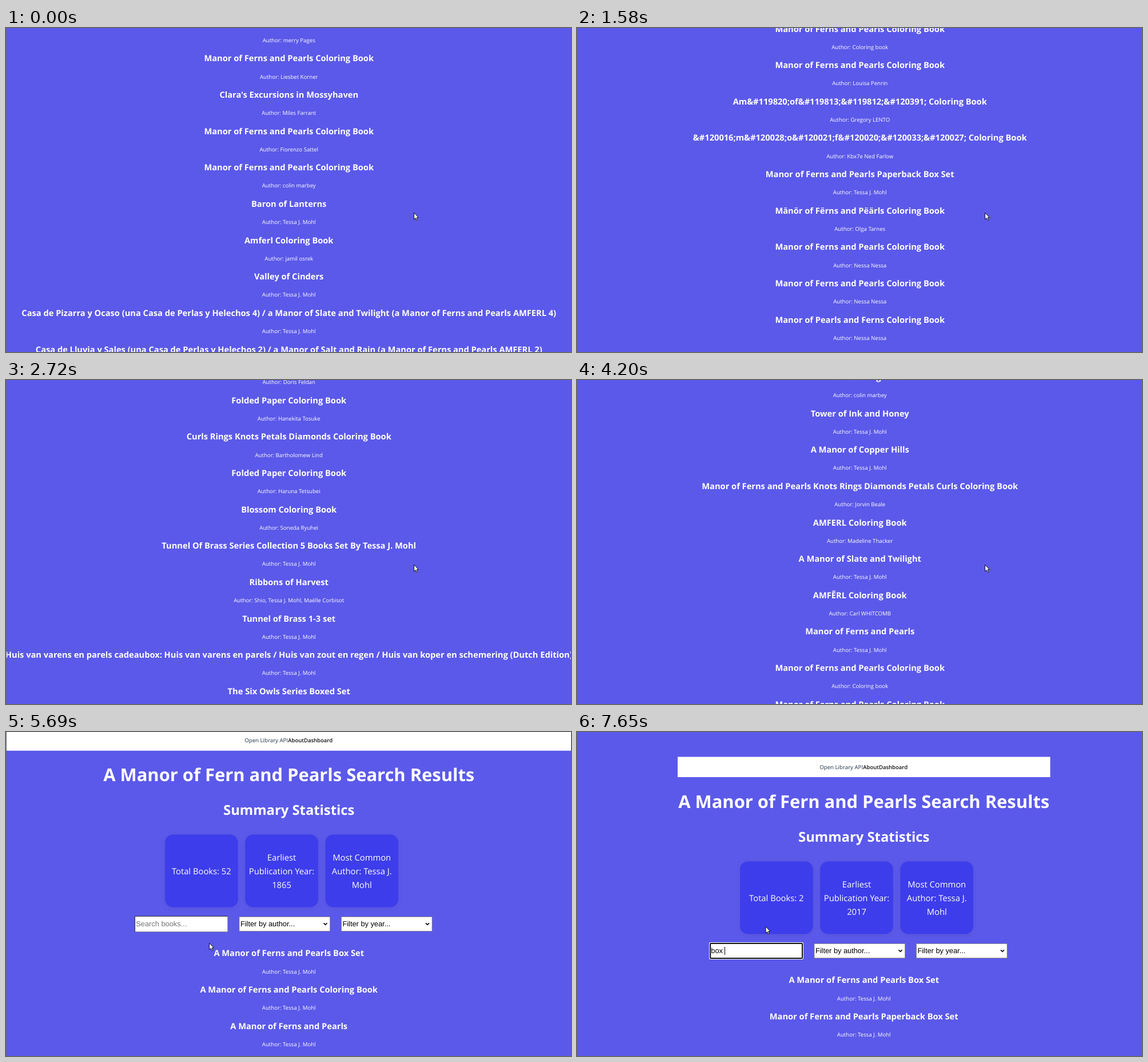
An HTML page with a canvas for the animation above (8000 ms loop, 988 by 567 pixels).

```html
<!DOCTYPE html>
<html lang="en">
<head>
<meta charset="utf-8">
<title>Book search dashboard</title>
<style>
html, body { margin: 0; width: 100%; height: 100%; overflow: hidden; background: #5b59e9; }
canvas { display: block; }
</style>
</head>
<body>
<canvas id="stage" width="988" height="567"></canvas>
<script>
const ctx = document.getElementById('stage').getContext('2d');
const LOOP = 8000;
const SANS = '"Open Sans", "Noto Sans", sans-serif';
const FORM = '"Liberation Sans", Arial, sans-serif';
const BG = '#5b59e9', CARD = '#3d3deb';
const CX = 494.7, PITCH = 63.65;

const LEAD = 'Tessa J. Mohl';
const SERIES = 'Manor of Ferns and Pearls';
const CB = 'Coloring Book';
const SCB = `${SERIES} ${CB}`;

// [title, author]; the lead author is the default
const books = [
  [`A ${SERIES} Box Set`],
  [`A ${SERIES} ${CB}`],
  [`A ${SERIES}`],
  ['Lantern of Glaciers'],
  ['The Copper Heiress'],
  ['A Manor of Hail and Amber'],
  ['Daughter of Willows'],
  [SCB, 'merry Pages'],
  [SCB, 'Liesbet Korner'],
  ["Clara's Excursions in Mossyhaven", 'Miles Farrant'],
  [SCB, 'Fiorenzo Sattel'],
  [SCB, 'colin marbey'],
  ['Baron of Lanterns'],
  [`Amferl ${CB}`, 'jamil osrek'],
  ['Valley of Cinders'],
  [`Casa de Pizarra y Ocaso (una Casa de Perlas y Helechos 4) / a Manor of Slate and Twilight (a ${SERIES} AMFERL 4)`],
  [`Casa de Lluvia y Sales (una Casa de Perlas y Helechos 2) / a Manor of Salt and Rain (a ${SERIES} AMFERL 2)`],
  ['A Manor of Salt and Rain'],
  [`Amferl ${CB}`, 'colin marbey'],
  ['Tower of Ink and Honey'],
  ['A Manor of Copper Hills'],
  [`${SERIES} Knots Rings Diamonds Petals Curls ${CB}`, 'Jorvin Beale'],
  [`AMFERL ${CB}`, 'Madeline Thacker'],
  ['A Manor of Slate and Twilight'],
  [`AMF\u1EBCRL ${CB}`, 'Carl WHITCOMB'],
  [SERIES],
  [SCB, 'Coloring book'],
  [SCB, 'Louisa Penrin'],
  [`Am&#119820;of&#119813;&#119812;&#120391; ${CB}`, 'Gregory LENTO'],
  [`&#120016;m&#120028;o&#120021;f&#120020;&#120033;&#120027; ${CB}`, 'Kbx7e Ned Farlow'],
  [`${SERIES} Paperback Box Set`],
  [`Mänör of Fërns and Pëärls ${CB}`, 'Olga Tarnes'],
  [SCB, 'Nessa Nessa'],
  [SCB, 'Nessa Nessa'],
  [`Manor of Pearls and Ferns ${CB}`, 'Nessa Nessa'],
  [`${SCB} for Kids and Adults`, 'Nessa Nessa'],
  [SCB, 'Doris Feldan'],
  [`Folded Paper ${CB}`, 'Hanekita Tosuke'],
  [`Curls Rings Knots Petals Diamonds ${CB}`, 'Bartholomew Lind'],
  [`Folded Paper ${CB}`, 'Haruna Tetsubei'],
  [`Blossom ${CB}`, 'Soneda Ryuhei'],
  [`Tunnel Of Brass Series Collection 5 Books Set By ${LEAD}`],
  ['Ribbons of Harvest', `Shio, ${LEAD}, Maëlle Corbisot`],
  ['Tunnel of Brass 1-3 set'],
  ['Huis van varens en parels cadeaubox: Huis van varens en parels / Huis van zout en regen / Huis van koper en schemering (Dutch Edition)'],
  ['The Six Owls Series Boxed Set'],
  ['Tunnel of Brass'],
  ['Heir of Lanterns'],
  ['The Brass Compass'],
  [`Blossom ${CB}`, 'Soneda Ryuhei'],
  ['Tower of Moss and Iron'],
  ['Meadow of Quiet Bells']
];

// [start ms, value...]
const scrollSteps = [
  [0, 843.3], [150, 960], [400, 1070], [520, 1290], [640, 1424.3],
  [1040, 1500], [1190, 1610], [1310, 1740], [1430, 1880], [1580, 2040.8],
  [1730, 2140], [1880, 2252], [2030, 2330], [2180, 2410], [2330, 2505],
  [2480, 2590], [2600, 2660], [2720, 2706.8], [3810, 2480], [3960, 2170],
  [4080, 1850], [4200, 1538.2], [4320, 1290], [4450, 1030], [4570, 790],
  [4720, 590], [4840, 365], [4990, 0]
];
const cursorSteps = [
  [0, 713, 323], [5420, 678, 325], [5570, 520, 350],
  [5690, 355, 369], [5840, 328, 335], [5960, 329.5, 340]
];
const querySteps = [
  [0, '', 1865], [7070, 'bo', 2014], [7500, 'box', 2017], [7650, 'box ', 2017]
];
const FOCUS = 6110, BLINK = 6640, TYPING = 7070, COMPACT = 7650;

const at = (steps, t) => steps.filter(s => s[0] <= t).pop();

function text(str, x, y, font, color = '#fff', align = 'center') {
  ctx.font = font;
  ctx.fillStyle = color;
  ctx.textAlign = align;
  ctx.fillText(str, x, y);
}

function rect(x, y, w, h, color) {
  ctx.fillStyle = color;
  ctx.fillRect(x, y, w, h);
}

function drawNav(compact) {
  if (compact) rect(169, -3.5, 651.5, 35.5, '#fff');
  else rect(1, -4, 987, 36.7, '#fff');
  text('Open Library API', 417.2, 18.4, `400 9.7px ${SANS}`, '#213547', 'left');
  text('AboutDashboard', 493.2, 18.4, `600 9.5px ${SANS}`, '#111', 'left');
}

function drawCard(x, lines) {
  ctx.save();
  ctx.shadowColor = 'rgba(0,0,0,0.06)';
  ctx.shadowBlur = 10;
  ctx.shadowOffsetY = 2;
  ctx.fillStyle = CARD;
  ctx.beginPath();
  ctx.roundRect(x, 179.5, 127.6, 127, 14);
  ctx.fill();
  ctx.restore();
  lines.forEach((line, i) => {
    const y = 249.2 + (i - (lines.length - 1) / 2) * 24;
    text(line, x + 63.8, y, `400 14.75px ${SANS}`);
  });
}

function drawSelect(x, label) {
  rect(x, 323, 159.5, 26, '#767676');
  rect(x + 0.8, 323.8, 157.9, 24.4, '#fff');
  text(label, x + 2.4, 340.3, `12.8px ${FORM}`, '#000', 'left');
  ctx.strokeStyle = '#000';
  ctx.lineWidth = 1.5;
  ctx.beginPath();
  ctx.moveTo(x + 148, 334.4);
  ctx.lineTo(x + 151, 337.4);
  ctx.lineTo(x + 154, 334.4);
  ctx.stroke();
}

function drawSearch(t, query) {
  if (t >= FOCUS) {
    ctx.fillStyle = '#fff';
    ctx.beginPath();
    ctx.roundRect(224, 321, 165, 30, 2.5);
    ctx.fill();
    ctx.fillStyle = '#101010';
    ctx.beginPath();
    ctx.roundRect(225, 322, 163, 28, 2);
    ctx.fill();
    rect(227, 324, 159, 24, '#fff');
  } else {
    rect(225, 322, 163, 28, '#9a9a9a');
    rect(225, 322, 163, 1, '#333');
    rect(225, 322, 1, 28, '#333');
    rect(226, 323, 161, 26, '#fff');
  }
  const font = `12.8px ${FORM}`;
  if (query) text(query, 227.3, 340.3, font, '#000', 'left');
  else text('Search books...', 227.3, 340.3, font, '#757575', 'left');
  if (t >= FOCUS && (t < BLINK || t >= TYPING)) {
    ctx.font = font;
    rect(227 + Math.round(ctx.measureText(query).width), 329, 1, 14, '#000');
  }
}

function drawBook([title, author = LEAD], i, scroll) {
  const y = 392.4 + i * PITCH;
  if (y - scroll < -50 || y - scroll > 600) return;
  text(title, CX, y, `700 14.65px ${SANS}`);
  text(`Author: ${author}`, CX, y + 30.2, `500 9.65px ${SANS}`);
}

function drawPointer(x, y) {
  const pts = [[0, 0], [0, 11.4], [2.6, 9], [4.4, 13.1], [6.2, 12.3], [4.5, 8.4], [7.8, 8.2]];
  ctx.beginPath();
  pts.forEach(([px, py]) => ctx.lineTo(x + 0.5 + px, y + 0.5 + py));
  ctx.closePath();
  ctx.fillStyle = '#fff';
  ctx.fill();
  ctx.strokeStyle = '#000';
  ctx.lineWidth = 0.9;
  ctx.stroke();
}

function draw(t) {
  const scroll = at(scrollSteps, t)[1];
  const [, query, year] = at(querySteps, t);
  const [, px, py] = at(cursorSteps, t);
  const compact = t >= COMPACT;
  const found = books.filter(b => b[0].toLowerCase().includes(query));

  rect(0, 0, 988, 567, BG);
  ctx.save();
  if (compact) ctx.translate(7, 47);
  ctx.translate(0, -scroll);
  if (scroll < 360) {
    drawNav(compact);
    text('A Manor of Fern and Pearls Search Results', CX, 85.5, `700 30.9px ${SANS}`);
    text('Summary Statistics', CX, 144.6, `700 23.8px ${SANS}`);
    drawCard(278, [`Total Books: ${found.length}`]);
    drawCard(418.2, ['Earliest', 'Publication Year:', String(year)]);
    drawCard(558.4, ['Most Common', 'Author: Tessa J.', 'Mohl']);
    drawSearch(t, query);
    drawSelect(407.5, 'Filter by author...');
    drawSelect(586, 'Filter by year...');
  }
  found.forEach((b, i) => drawBook(b, i, scroll));
  ctx.restore();
  rect(0, 0, 1, 567, '#68687a');
  drawPointer(px, py);
}

ctx.textRendering = 'geometricPrecision';
const start = performance.now();
function tick() {
  draw((performance.now() - start) % LOOP);
  requestAnimationFrame(tick);
}
tick();
</script>
</body>
</html>
```
